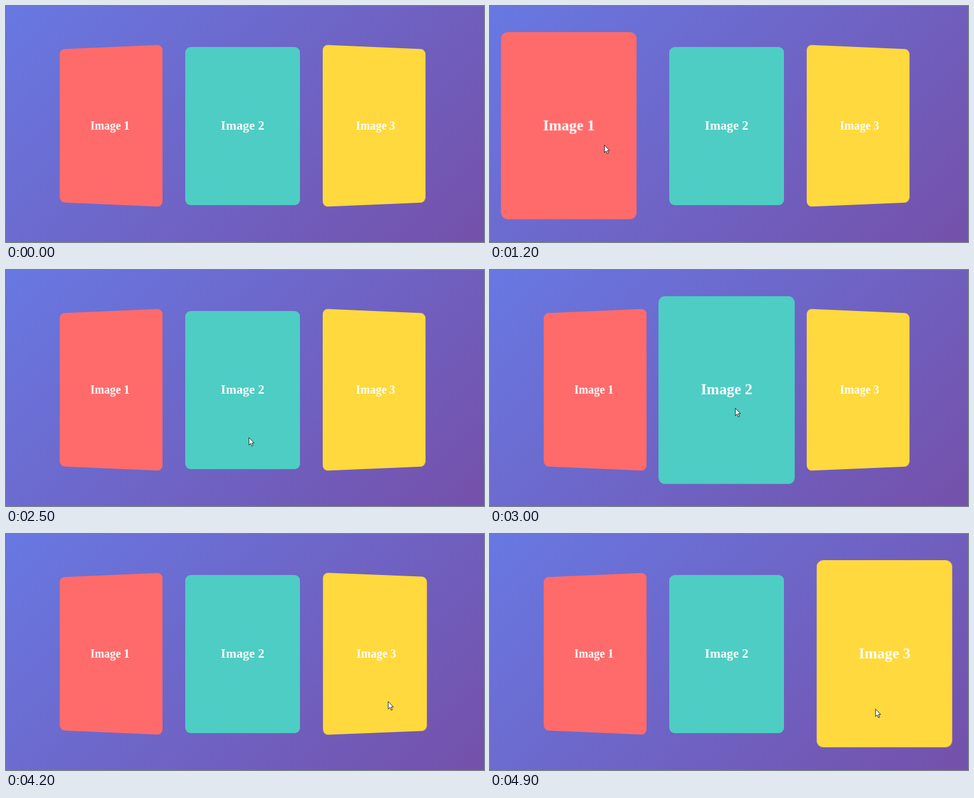
Write an HTML page that moves like this. It is 800 px wide and 397 px high and loops after 5 s.

```html
<!DOCTYPE html>
<html lang="en">
<head>
<meta charset="utf-8">
<title>Card gallery</title>
<style>
  html, body { margin: 0; width: 100%; height: 100%; overflow: hidden; }
  .stage {
    position: relative; width: 800px; height: 397px; overflow: hidden;
    background: linear-gradient(135deg, #667eea -14%, #764ba2 114%);
  }
  .gallery {
    position: absolute; inset: 0;
    perspective: 875px; perspective-origin: 396px 202px;
  }
  .card {
    position: absolute; top: 69.4px; left: calc(300.3px + var(--slot) * 222.7px);
    width: 191.4px; height: 265.2px; border-radius: 9px;
    display: flex; align-items: center; justify-content: center;
    background: var(--color); color: #fff;
    font: bold 21.3px "Liberation Serif", "Times New Roman", serif;
  }
  .cursor { position: absolute; left: 0; top: 0; overflow: visible; }
</style>
</head>
<body>
<div class="stage">
  <div class="gallery">
    <div class="card" style="--slot:-1; --color:#ff6b6b">Image 1</div>
    <div class="card" style="--slot:0; --color:#4ecdc4">Image 2</div>
    <div class="card" style="--slot:1; --color:#ffd93d">Image 3</div>
  </div>
  <svg class="cursor" width="12" height="18">
    <path d="M.5 .5V13L3.4 10.4 5.4 15 7.4 14.1 5.4 9.7H9.2Z" fill="#fff" stroke="#111" stroke-width=".9" stroke-linejoin="round"/>
  </svg>
</div>
<script>
const LOOP = 5000, TICK = 100;
const FADE = 300, TILT = 15, LIFT = 138, LEAVE_LAG = 311;

const cards = [...document.querySelectorAll('.card')];
const cursor = document.querySelector('.cursor');

// One pointer visit per card: it glides up to (x, y), rests, then drops away
const visits = [
  { hover: 810, arrive: 950, depart: 1480, x: 189, y: 229 },
  { hover: 2510, arrive: 2608, depart: 3300, x: 407, y: 225 },
  { hover: 4178, arrive: 4180, depart: LOOP, x: 639, y: 281 }
];

const clamp = v => Math.min(1, Math.max(0, v));
const bezier = (a, b, u) => 3 * a * u * (1 - u) ** 2 + 3 * b * u * u * (1 - u) + u ** 3;

// CSS "ease": cubic-bezier(.25, .1, .25, 1)
function ease(x) {
  let lo = 0, hi = 1;
  for (let i = 0; i < 24; i++) {
    const mid = (lo + hi) / 2;
    if (bezier(.25, .25, mid) < x) lo = mid; else hi = mid;
  }
  return bezier(.1, 1, lo);
}

const fade = (t, start) => ease(clamp((t - start) / FADE));

function drawCard(card, i, t) {
  const { hover, depart } = visits[i];
  const p = fade(t, hover) - fade(t, depart + LEAVE_LAG);
  const angle = (i - 1) * TILT * (1 - p);
  card.style.transform = `rotateY(${angle}deg) translateZ(${LIFT * p ** 1.4}px)`;
}

function drawCursor(t) {
  const visit = visits.find(v => t >= v.arrive - 250 && t < v.depart + 150);
  cursor.style.visibility = visit ? 'visible' : 'hidden';
  if (!visit) return;
  const { arrive, depart, x, y } = visit;
  const drift = t - arrive;
  const drop = .54 * Math.max(0, -drift) + .9 * Math.max(0, t - depart);
  cursor.style.transform = `translate(${x + .008 * drift}px, ${y + .018 * drift + drop}px)`;
}

const start = performance.now();
function loop() {
  const elapsed = (performance.now() - start) % LOOP;
  const t = Math.floor(elapsed / TICK) * TICK;
  cards.forEach((card, i) => drawCard(card, i, t));
  drawCursor(t);
  requestAnimationFrame(loop);
}
loop();
</script>
</body>
</html>
```
